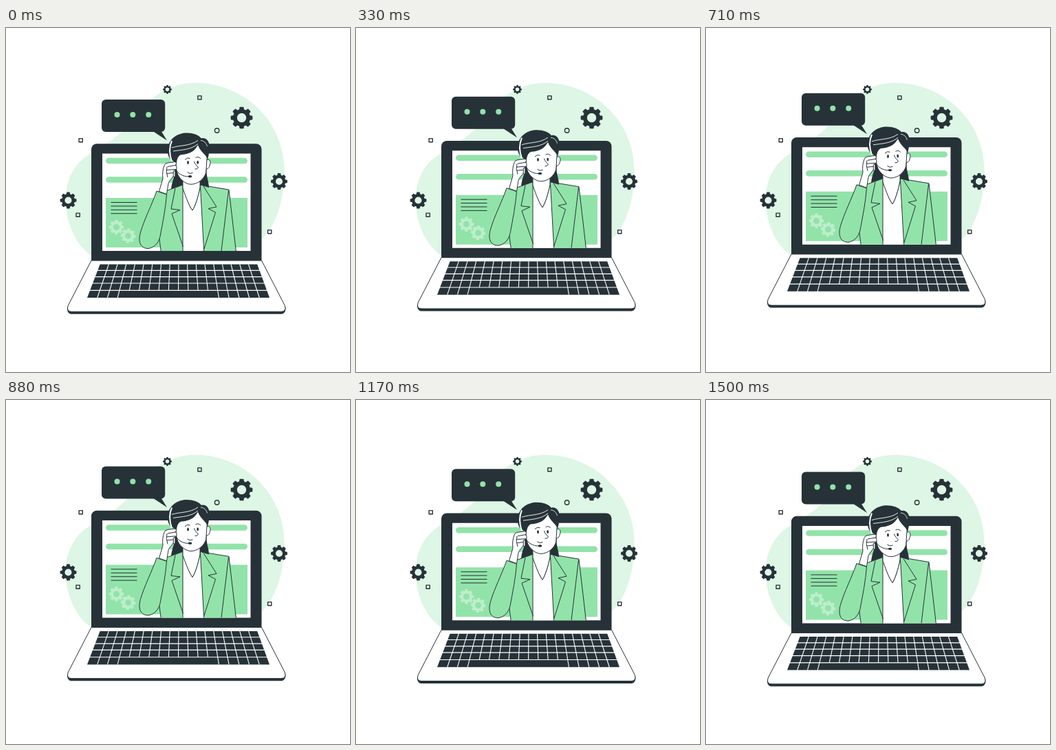
Animation, 500 px wide and 500 px high, one loop 1.54 s. Source, as an HTML page with a canvas:

```html
<!DOCTYPE html>
<html lang="en">
<head>
<meta charset="utf-8">
<title>Support call</title>
<style>
  html, body { margin: 0; width: 100%; height: 100%; overflow: hidden; background: #fff; }
  canvas { display: block; width: 500px; height: 500px; }
</style>
</head>
<body>
<canvas id="stage"></canvas>
<script>
const DARK = '#263238', GREEN = '#92e3a9', PALE = '#def6e5', MIST = '#bdeecb', WHITE = '#fff';
const LOOP = 1540, STEPS = 37, FPS = 24, LIFT = 10;

const canvas = document.getElementById('stage');
const ctx = canvas.getContext('2d');
const ratio = window.devicePixelRatio || 1;
canvas.width = canvas.height = 500 * ratio;

function shape(d, fill, stroke, width = 1) {
  const path = new Path2D(d);
  if (fill) { ctx.fillStyle = fill; ctx.fill(path); }
  if (stroke) { ctx.strokeStyle = stroke; ctx.lineWidth = width; ctx.stroke(path); }
}
const line = (d, width = 1, color = DARK) => shape(d, null, color, width);

function box(x, y, w, h, fill, radius = 0) {
  ctx.beginPath();
  ctx.roundRect(x, y, w, h, radius);
  ctx.fillStyle = fill;
  ctx.fill();
}

function oval(x, y, rx, ry, fill) {
  ctx.beginPath();
  ctx.ellipse(x, y, rx, ry, 0, 0, 7);
  ctx.fillStyle = fill;
  ctx.fill();
}

function gear(x, y, r, color, turn = 0) {
  const teeth = 8, root = r * 0.79;
  ctx.beginPath();
  for (let i = 0; i < teeth; i++) {
    const a = turn + i * 2 * Math.PI / teeth;
    for (const [da, rad] of [[-0.27, root], [-0.2, r * 0.97], [-0.13, r], [0.13, r], [0.2, r * 0.97], [0.27, root]]) {
      ctx.lineTo(x + rad * Math.cos(a + da), y + rad * Math.sin(a + da));
    }
  }
  ctx.closePath();
  ctx.moveTo(x + r * 0.42, y);
  ctx.arc(x, y, r * 0.42, 0, 2 * Math.PI);
  ctx.fillStyle = color;
  ctx.fill('evenodd');
}

function backdrop() {
  shape('M275 79.7C346 79.7 404.6 136 404.6 207C404.6 250 393 289 368 311L340 334H130' +
        'C104 321 86.7 286 86.7 250C86.7 220 100 196 122 183C136 175 151 166 165 154' +
        'C183 141 190 122 210 105C226 90 250 79.7 275 79.7Z', PALE);
  gear(342.5, 130.5, 16, DARK);
  gear(397, 223, 12, DARK);
  gear(90.5, 250.5, 12, DARK);
  gear(234.5, 89.3, 6.4, DARK);
  ctx.strokeStyle = DARK;
  ctx.lineWidth = 1.4;
  for (const [x, y] of [[281.4, 101.2], [108.7, 163.2], [104.6, 271.7], [383.2, 296.2]]) {
    ctx.strokeRect(x - 2.6, y - 2.6, 5.2, 5.2);
  }
  ctx.beginPath();
  ctx.arc(306.6, 149, 3.2, 0, 7);
  ctx.stroke();
}

function bubble() {
  box(139, 104, 92.2, 47, DARK, 6);
  shape('M213.5 150L234 163.5L225 149Z', DARK);
  for (const x of [161.5, 184.3, 207.2]) oval(x, 126, 4, 4, GREEN);
}

function screen() {
  box(124, 168.2, 247.5, 170, DARK, [8, 8, 0, 0]);
  box(140, 182.5, 215.5, 141.5, WHITE);
  box(145, 188.7, 206, 8.6, GREEN, 4.3);
  box(145, 216.2, 206, 8.6, GREEN, 4.3);
  box(145, 247, 206, 72, GREEN);
  for (let i = 0; i < 4; i++) line(`M152.5 ${253.5 + i * 5.4}H190.5`);
  gear(160.5, 289.5, 10.8, MIST);
  gear(177.6, 302, 10.8, MIST, 0.1);
}

function keyboard() {
  const top = 343.5, bottom = 392, columns = 18;
  const rows = [352.3, 361.6, 371, 381.3];
  const edge = (u, y) => {
    const k = (y - top) / (bottom - top);
    return (1 - k) * (136.6 + 228.6 * u) + k * (118 + 265 * u);
  };
  shape(`M${edge(0, top)} ${top}H${edge(1, top)}L${edge(1, bottom)} ${bottom}H${edge(0, bottom)}Z`, DARK);
  for (const y of rows) line(`M${edge(0, y) - 1} ${y}H${edge(1, y) + 1}`, 1.2, WHITE);
  for (let i = 1; i < columns; i++) {
    const u = i / columns, end = i > 3 && i < 13 ? rows[3] : bottom;
    line(`M${edge(u, top)} ${top}L${edge(u, end)} ${end}`, 1.1, WHITE);
  }
}

function base() {
  shape('M89 406C88.5 412.5 91 415.8 96 415.8H399C404 415.8 407 412.5 406.3 406Z', DARK);
  shape('M124 338L90.2 403.5Q87.5 412 95 412.3H400Q408 412 405.3 403.5L371.5 338Z', WHITE, DARK);
  keyboard();
}

function jacket() {
  shape('M257 228L232 237L222 300L226 330H335L324 235L282 228Z', GREEN, DARK);
  shape('M257 222V330H288L282 222Z', WHITE, DARK);
  line('M257.5 231C262 247 267 260 271 265C275 259 279 246 282 231');
  line('M246 233L240 263L253 264.5L241 270L257.5 318');
  line('M287 230L306 260L294 262.5L304.5 268L288 321');
  line('M323.5 236L313 324');
  shape('M219 237C212 257 201 278 195.5 297C191 313 197 320.7 207 320.5C216 319 222 312 224 303' +
        'C228 282 232 262 233.5 242Z', GREEN, DARK);
}

function head() {
  shape('M246 203C247 214 241 222 240 234L257 228L282 228L295 232C295 222 290 215 292 202Z', DARK);
  shape('M257 215V233C262 248 267 260 271 265C275 259 279 246 282 232V216Z', WHITE, DARK);
  shape('M291 192C297 189 298 195 296 200C295 204.5 292 205.5 289.5 203.5Z', WHITE, DARK);
  shape('M248 182C246.5 198 247 206 250 213.5C254 221.5 262 227.2 269 227.2' +
        'C279 227 288.5 219 290.7 210L292.5 183C280 162 255 164 248 182Z', WHITE, DARK);
  shape('M243 193C236 190 234 183 235.3 174C237.5 160 250 152.6 263 152.6C272 152.6 280 155.5 284 160.5' +
        'C290 158.5 296 164 295.7 173C295.6 180 294.6 186 293 191C291.5 184 282 180 279 170' +
        'C274 180.5 264 183.5 256 184C251 184.5 248.5 188.5 247.7 198Z', DARK);
  line('M241 174C253 170 267 172 279 163.5', 0.9, WHITE);
  line('M243 179C256 177 269 177 279 168.5', 0.9, WHITE);
  line('M283 163.5C288 164 291 167 292.5 172', 0.8, WHITE);
  line('M241 164C236.5 174 237.5 184 241 194', 2, WHITE);

  oval(264.5, 195.6, 1.4, 2.5, DARK);
  oval(278.7, 195.2, 1.4, 2.5, DARK);
  line('M260 191.5Q263 187.5 267.5 189.5M275.5 188.5Q280 186 283 190');
  line('M273.5 194C274 198 278 200 279.5 203Q278 205.5 274.5 205');
  line('M263.5 209.5Q267 213 271.5 210.5');
}

function hand() {
  shape('M222.5 237.5L228 219C227 212 228 205 230 200Q231 196.5 235 196L246 194.5' +
        'Q249 196.5 246.5 199.5L248 202Q249 205 246 206L244 209V214' +
        'C242 218 237 222 236 226L233.5 241.5Z', WHITE, DARK);
  line('M246.5 199.5L235 201.5M246 205.5L233 206.5M243 210.5L234 211.5M234 201.5Q232 209 235 217');
  box(242.8, 207, 4, 10, DARK, 2);
  box(243.8, 208, 1.6, 8, WHITE, 0.8);
  line('M247 206C250 211 256 216 266 216');
  oval(267.5, 215.8, 2.8, 1.7, DARK);
}

function woman() {
  ctx.save();
  ctx.beginPath();
  ctx.rect(130, 100, 240, 224);
  ctx.clip();
  jacket();
  head();
  hand();
  ctx.restore();
}

// Straight rise and fall, sampled at the animation's own frame rate.
function bob(time) {
  const step = Math.min(STEPS - 1, Math.floor((time + 3.4) * FPS / 1000));
  const phase = (step + 1) / STEPS;
  return LIFT * (2 / STEPS - 1 + Math.abs(2 * phase - 1));
}

function draw(now) {
  ctx.setTransform(ratio, 0, 0, ratio, 0, 0);
  ctx.lineJoin = 'round';
  ctx.fillStyle = WHITE;
  ctx.fillRect(0, 0, 500, 500);
  backdrop();
  ctx.translate(0, bob(Math.max(0, now - start) % LOOP));
  bubble();
  screen();
  base();
  woman();
  requestAnimationFrame(draw);
}

const start = performance.now();
draw(start);
</script>
</body>
</html>
```
